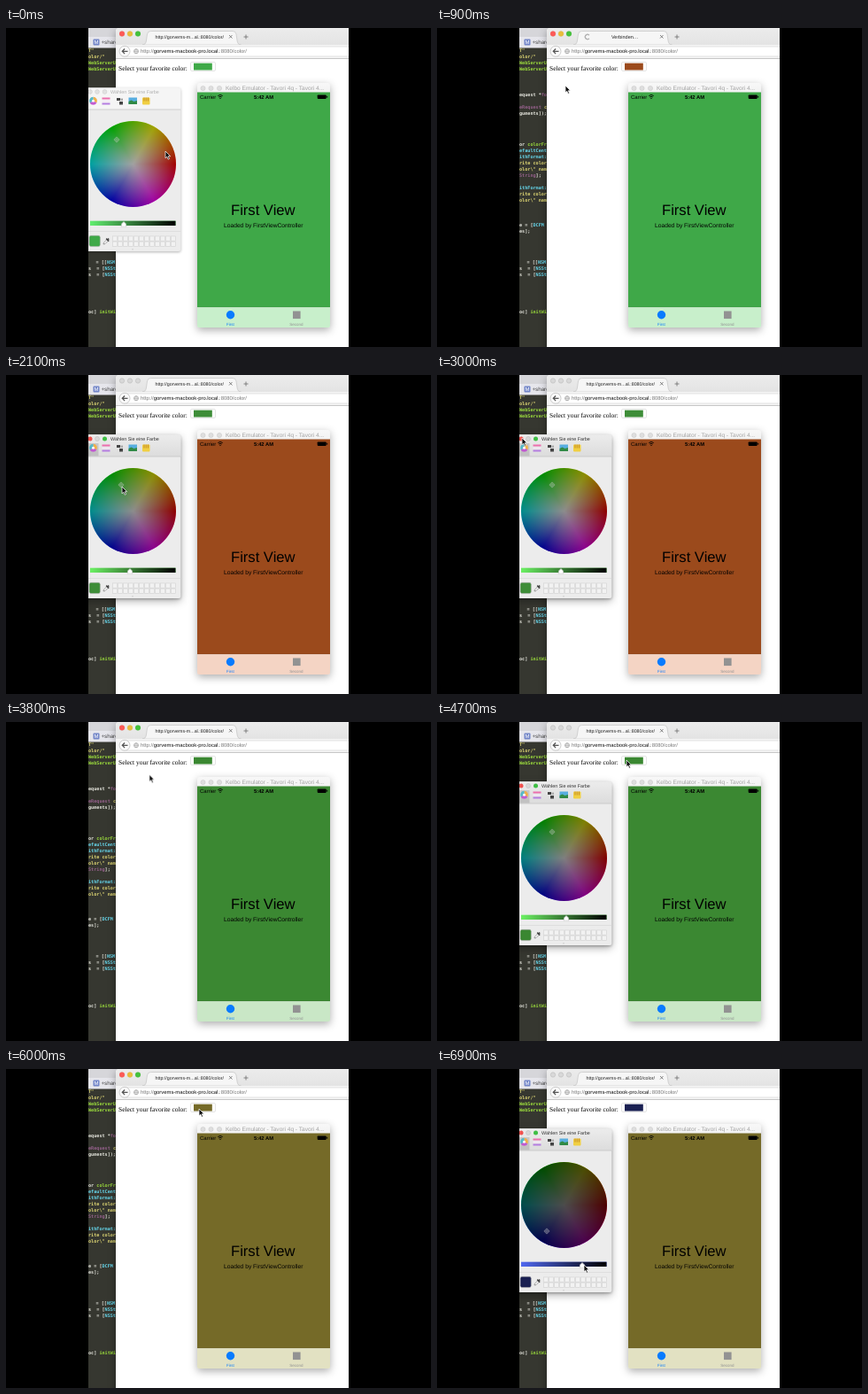
These frames come from a looping animation (480 by 360 pixels, 7000 ms). An HTML page:

```html
<!DOCTYPE html>
<html lang="de">
<head>
<meta charset="utf-8">
<title>Color picker</title>
<style>
html, body { margin: 0; width: 100%; height: 100%; overflow: hidden; background: #000; }
.stage { position: relative; width: 480px; height: 360px; overflow: hidden; clip-path: inset(0 93px 0 93px); }
.stage > *, .picker > * { position: absolute; left: 0; top: 0; }
.picker { width: 480px; height: 360px; }
svg { display: block; }
text { font-family: "Liberation Sans", Arial, sans-serif; text-rendering: geometricPrecision; white-space: pre; }
.code text { font: bold 5.15px "DejaVu Sans Mono", monospace; fill: #e8e8e0; }
.code .s { fill: #e0d874; }
.code .g { fill: #9bdc3c; }
.code .c { fill: #66d9ef; }
.code .p { fill: #94608a; }
.shadow { filter: drop-shadow(0 3px 5px rgba(0, 0, 0, .32)); }
.thin { filter: drop-shadow(0 1px 1.5px rgba(0, 0, 0, .3)); }

.picker .wheel { left: 94.8px; top: 105px; width: 97px; height: 97px; border-radius: 50%; overflow: hidden;
  background: radial-gradient(closest-side, #fff, rgba(255, 255, 255, 0)),
    conic-gradient(from 90deg, #f00, #f0f, #00f, #0ff, #0f0, #ff0, #f00); }
.dark { width: 100%; height: 100%; background: #000; }

.picker, .focus, .active, .title, .busy, .pick, .hue, .sim, .knob, .dark, .cross { animation: 7s step-end infinite; }
.picker { animation-name: picker; }
.focus { animation-name: focus; }
.active { animation-name: active; }
.title { animation-name: title; }
.busy { animation-name: busy; }
.pick { animation-name: pick; fill: currentColor; }
.hue { animation-name: hue; }
.sim { animation-name: sim; }
.knob { animation-name: knob; }
.dark { animation-name: dark; }
.cross { animation-name: cross; }
.spin { animation: spin .8s linear infinite; }
.cursor { animation: cursor 7s ease-in-out infinite; }

@keyframes picker { 0%, 21.4%, 65.7%, 87.1% { opacity: 1 } 10.7%, 44.3%, 77.1% { opacity: 0 } }
@keyframes focus { 2.8%, 21.4%, 65.7%, 87.1% { opacity: 0 } 0%, 10.7%, 44.3%, 77.1% { opacity: 1 } }
@keyframes active { 0% { opacity: 0 } 2.8%, 100% { opacity: 1 } }
@keyframes title { 0%, 15.7%, 49.3%, 81.4% { opacity: 1 } 11.4%, 45%, 77.8% { opacity: 0 } }
@keyframes busy { 0%, 15.7%, 49.3%, 81.4% { opacity: 0 } 11.4%, 45%, 77.8% { opacity: 1 } }
@keyframes pick {
  0% { color: #3fa948 }
  2.8% { color: #9b4a1c }
  28.5% { color: #3e8d38 }
  45% { color: #3a8731 }
  71.4% { color: #756a28 }
  90.7% { color: #272f82 }
  93.6% { color: #272f82; animation-timing-function: linear }
  97.9%, 100% { color: #1a2052 }
}
@keyframes hue {
  0% { fill: #62ee70 }
  2.8% { fill: #ff7a2e }
  28.5% { fill: #6cf064 }
  71.4% { fill: #ffe757 }
  90.7%, 100% { fill: #5068f0 }
}
@keyframes sim {
  0% { fill: #3fa848; color: #c8efcb }
  15% { fill: #9b4a1c; color: #f4d4c4 }
  48.6% { fill: #3b8832; color: #c9e7c6 }
  81.4%, 100% { fill: #756a28; color: #e2e1c2 }
}
@keyframes knob {
  0% { transform: translate(133px, 221.5px) }
  21.4% { transform: translate(140px, 221.5px) }
  65.7% { transform: translate(146px, 221.5px) }
  93.6% { transform: translate(146px, 221.5px); animation-timing-function: linear }
  97.9%, 100% { transform: translate(164px, 221.5px) }
}
@keyframes dark {
  0% { opacity: .37 }
  21.4% { opacity: .45 }
  65.7% { opacity: .5 }
  93.6% { opacity: .5; animation-timing-function: linear }
  97.9%, 100% { opacity: .7 }
}
@keyframes cross {
  0% { transform: translate(125px, 126px) }
  2.8% { transform: translate(180px, 139px) }
  28.5% { transform: translate(130px, 124px) }
  71.4% { transform: translate(163px, 129px) }
  90.7%, 100% { transform: translate(124px, 183px) }
}
@keyframes cursor {
  0%, 3.6% { transform: translate(180px, 139px) }
  8.6%, 10.7% { transform: translate(96px, 71px) }
  12.86% { transform: translate(145px, 65px) }
  18.6%, 21.4% { transform: translate(218px, 44px) }
  28.5%, 33% { transform: translate(131px, 126px) }
  41.5%, 45% { transform: translate(96px, 71px) }
  53% { transform: translate(160px, 60px) }
  63%, 67.3% { transform: translate(214px, 43px) }
  71.4%, 73.5% { transform: translate(163px, 129px) }
  76.4%, 77.8% { transform: translate(96px, 71px) }
  85%, 87.8% { transform: translate(218px, 45px) }
  90.7%, 91.4% { transform: translate(124px, 183px) }
  93.6% { transform: translate(148px, 221px); animation-timing-function: linear }
  97.9%, 100% { transform: translate(166px, 221px) }
}
@keyframes spin { to { transform: rotate(360deg) } }
</style>
</head>
<body>
<div class="stage">
<svg width="480" height="360">
  <defs>
    <linearGradient id="chrome" x2="0" y2="1"><stop stop-color="#ececec"/><stop offset="1" stop-color="#dcdcdc"/></linearGradient>
    <linearGradient id="bar" x2="0" y2="1"><stop stop-color="#f8f8f8"/><stop offset="1" stop-color="#f2f2f2"/></linearGradient>
    <linearGradient id="fade"><stop stop-opacity="0"/><stop offset="1"/></linearGradient>
    <pattern id="cells" x="120" y="234.5" width="6" height="6.2" patternUnits="userSpaceOnUse">
      <rect x=".5" y=".5" width="5" height="5.2" fill="#f2f2f2" stroke="#d6d6d6" stroke-width=".7"/>
    </pattern>
  </defs>

  <!-- editor -->
  <rect x="93" width="40" height="360" fill="#363730"/>
  <rect x="93" width="40" height="10" fill="#d6d6da"/>
  <rect x="93" y="10" width="40" height="12.5" fill="#e6e6ec"/>
  <rect x="98.500" y="12.500" width="7" height="7" rx="1" fill="#7285c8"/>
  <text x="99.600" y="18.200" font-size="6" fill="#fff">M</text>
  <text x="107.500" y="18.200" font-size="6.200" fill="#444">+shared</text>
  <g class="code">
    <text class="s" x="93" y="27">T"</text>
    <text class="s" x="93" y="34">olor/"</text>
    <text class="g" x="93" y="41">WebServerURL</text>
    <text class="g" x="93" y="48">WebServerURL</text>
    <text x="93" y="77">equest *<tspan class="p">for</tspan></text>
    <text x="93" y="91"><tspan class="p">eRequest</tspan> <tspan class="s">c</tspan></text>
    <text x="93" y="98">guments]);</text>
    <text x="93" y="133">or <tspan class="g">colorFro</tspan></text>
    <text class="c" x="93" y="140">efaultCent</text>
    <text class="c" x="93" y="147">ithFormat:</text>
    <text class="s" x="93" y="154">rite color</text>
    <text class="s" x="93" y="161">olor\" name</text>
    <text x="93" y="168"><tspan class="p">String</tspan>];</text>
    <text class="c" x="93" y="182">ithFormat:</text>
    <text class="s" x="93" y="189">rite color</text>
    <text class="s" x="93" y="196">olor\" name</text>
    <text x="93" y="224">e = [<tspan class="c">DCFM</tspan></text>
    <text x="93" y="231">es];</text>
    <text x="101.500" y="266">= [[<tspan class="c">NSM</tspan></text>
    <text x="93" y="273">s  = [<tspan class="c">NSSt</tspan></text>
    <text x="93" y="280">s  = [<tspan class="c">NSSt</tspan></text>
    <text x="93" y="322">oc] <tspan class="g">initWi</tspan></text>
  </g>

  <!-- browser -->
  <rect class="shadow" x="124" y="0" width="280" height="380" rx="4" fill="#fff"/>
  <path d="M124 35V4q0-4 4-4H390V35z" fill="url(#chrome)"/>
  <path d="M154 19q4 0 4.500-5l1-7q.5-3.500 4-3.500H256q3.500 0 4 3.500l1 7q.5 5 4.500 5z" fill="#f6f6f6" stroke="#bcbcbc" stroke-width=".6"/>
  <rect x="124" y="19" width="266" height="15" fill="#f5f5f5"/>
  <path d="M124 34.500H390" stroke="#c0c0c0" stroke-width=".8"/>
  <g fill="#d8d8d8" stroke="#b4b4b4" stroke-width=".5">
    <circle cx="131" cy="6.500" r="2.700"/><circle cx="140" cy="6.500" r="2.700"/><circle cx="149" cy="6.500" r="2.700"/>
  </g>
  <g class="focus">
    <circle cx="131" cy="6.500" r="3" fill="#fc5b57"/><circle cx="140" cy="6.500" r="3" fill="#e8bd3c"/><circle cx="149" cy="6.500" r="3" fill="#45c13c"/>
  </g>
  <text class="title" x="168.500" y="12" font-size="5.300" fill="#222">http://gorvems-m...al.:8080/color/</text>
  <g class="busy">
    <text x="197" y="12" font-size="5.500" fill="#222">Verbinden…</text>
    <g transform="translate(170 10)"><path class="spin" d="M2.800 0A2.800 2.800 0 1 1 0-2.800" fill="none" stroke="#8a8a8a"/></g>
  </g>
  <path d="M252 8l3.500 3.500m0-3.500l-3.500 3.500M268.500 10h5m-2.500-2.500v5" stroke="#777" stroke-width=".9"/>
  <rect x="136" y="21" width="260" height="11" fill="#fff" stroke="#d0d0d0" stroke-width=".6"/>
  <circle cx="134" cy="26.300" r="6" fill="#fafafa" stroke="#b8b8b8" stroke-width=".7"/>
  <path d="M137.500 26.300h-6m2.600-2.800l-2.800 2.800l2.800 2.800" fill="none" stroke="#555" stroke-width="1.300"/>
  <g fill="none" stroke="#999" stroke-width=".6"><circle cx="147" cy="26.300" r="2.600"/><ellipse cx="147" cy="26.300" rx="1.200" ry="2.600"/><path d="M144.400 26.300h5.200"/></g>
  <text x="152" y="28.300" font-size="5.900" fill="#777">http://<tspan fill="#111">gorvems-macbook-pro.local.</tspan>:8080/color/</text>
  <text x="127" y="47.600" font-size="7.450" style="font-family:'Liberation Serif',Times,serif">Select your favorite color:</text>
  <rect x="208.500" y="38.500" width="28" height="10" rx="1.500" fill="#fff" stroke="#dadada" stroke-width=".7"/>
  <rect class="pick" x="212" y="39.700" width="20.800" height="7.800"/>

  <!-- phone -->
  <rect class="shadow" x="216" y="62" width="150" height="276" rx="2.500" fill="#eee"/>
  <path d="M216 73V65q0-3 3-3H363q3 0 3 3v8z" fill="url(#bar)"/>
  <g fill="#dedede" stroke="#c6c6c6" stroke-width=".5">
    <circle cx="222.500" cy="68" r="2.600"/><circle cx="231.500" cy="68" r="2.600"/><circle cx="241" cy="68" r="2.600"/>
  </g>
  <text x="248" y="70.300" font-size="6.550" fill="#a4a4a4">Kelbo Emulator - Tavori 4q - Tavori 4...</text>
  <g class="sim">
    <rect x="216" y="72.500" width="150" height="243"/>
    <path d="M216 315H366V336q0 2-2 2H218q-2 0-2-2z" fill="currentColor"/>
  </g>
  <path d="M216 315H366" stroke="#000" stroke-opacity=".2" stroke-width=".5"/>
  <text x="219" y="80" font-size="6">Carrier</text>
  <g fill="none" stroke="#000" stroke-width=".9"><path d="M239.300 76.500q2.700-2.200 5.400 0M240.300 78q1.700-1.400 3.400 0"/><circle cx="242" cy="79.400" r=".3"/></g>
  <text x="291" y="80" font-size="5.800" font-weight="bold" text-anchor="middle">5:42 AM</text>
  <rect x="351.700" y="75.500" width="10" height="4.400" rx=".8"/><rect x="362.200" y="76.800" width="1" height="1.800"/>
  <text x="254" y="211" font-size="16.600">First View</text>
  <text x="246" y="225" font-size="6.700">Loaded by FirstViewController</text>
  <circle cx="253.500" cy="323.800" r="4.700" fill="#087bff"/>
  <rect x="324" y="319.500" width="8.600" height="8.600" fill="#929292"/>
  <text x="253.300" y="336" font-size="4.500" text-anchor="middle" fill="#087bff">First</text>
  <text x="328" y="336" font-size="4.500" text-anchor="middle" fill="#929292">Second</text>
</svg>

<div class="picker">
  <svg width="480" height="360">
    <rect class="thin" x="80" y="67.500" width="117.300" height="184.500" rx="2.500" fill="#ececec"/>
    <path d="M80 92V67.500H194.300q3 0 3 3V92z" fill="#f5f5f5"/>
    <g fill="#e2e2e2" stroke="#c8c8c8" stroke-width=".5">
      <circle cx="95" cy="72" r="2.400"/><circle cx="103" cy="72" r="2.400"/><circle cx="111.500" cy="72" r="2.400"/>
    </g>
    <text x="118" y="74" font-size="5.400" fill="#b0b0b0">Wählen Sie eine Farbe</text>
    <g class="active">
      <rect class="shadow" x="80" y="67.500" width="117.300" height="184.500" rx="2.500" fill="#ececec"/>
      <path d="M80 92V67.500H194.300q3 0 3 3V92z" fill="url(#chrome)"/>
      <circle cx="95" cy="72" r="2.500" fill="#f0524f"/><circle cx="103" cy="72" r="2.500" fill="#d8d8d8" stroke="#b8b8b8" stroke-width=".5"/><circle cx="111.500" cy="72" r="2.500" fill="#3fbf45"/>
      <text x="118" y="74" font-size="5.400" fill="#333">Wählen Sie eine Farbe</text>
      <rect x="93" y="77" width="11.500" height="14.500" fill="#000" opacity=".13"/>
    </g>
    <path d="M80 92H197.300" stroke="#c2c2c2" stroke-width=".7"/>
    <path d="M80 229.500H197.300" stroke="#d8d8d8" stroke-width=".7"/>
    <g transform="translate(98.500 82.300)">
      <path d="M0 0V-4.500A4.500 4.500 0 0 1 3.900 2.250z" fill="#f0b04c"/>
      <path d="M0 0L3.900 2.250A4.500 4.500 0 0 1-3.900 2.250z" fill="#c15ad0"/>
      <path d="M0 0L-3.900 2.250A4.500 4.500 0 0 1 0-4.500z" fill="#57b9c8"/>
      <circle r="1.500" fill="#fff"/>
    </g>
    <g stroke-width="2"><path d="M108.500 79.500h9" stroke="#ec6fae"/><path d="M108.500 82.500h9" stroke="#f3e9f4"/><path d="M108.500 85.500h9" stroke="#b47de0"/></g>
    <path d="M125 79h4v3h-4zM128 83h4v3.500h-4z" fill="#444"/><path d="M129.500 79.500h2.500v2.500h-2.500z" fill="#aaa"/>
    <rect x="138.500" y="78.500" width="9.500" height="7.500" fill="#58aee0"/><path d="M138.500 86v-3l3-1.500l3 1.500l3.500-1v4z" fill="#318a45"/>
    <rect x="154" y="78.500" width="8.500" height="8" rx="1" fill="#f0cf42"/><path d="M156 78.500v4m2.200-4v4m2.200-4v4" stroke="#c58a28" stroke-width="1"/>
    <rect class="hue" x="95" y="217.700" width="96.500" height="5.300"/>
    <rect x="95" y="217.700" width="96.500" height="5.300" fill="url(#fade)"/>
    <path class="knob" d="M0-3l2.700 2.600v3.200h-5.400v-3.200z" fill="#fff" stroke="#aaa" stroke-width=".4"/>
    <rect class="pick" x="94" y="234.300" width="12.300" height="12.300" rx="2" stroke="#aaa" stroke-width=".6"/>
    <path d="M110 244l.5-1.800l3.500-3.500l1.400 1.400l-3.500 3.500z" fill="#fff" stroke="#666" stroke-width=".6"/>
    <path d="M113.200 237.600l3 3m-1.700-1.300l1.700-1.700" stroke="#444" stroke-width="1.500"/>
    <rect x="120" y="234.500" width="72" height="12.400" fill="url(#cells)"/>
    <circle cx="143" cy="249.700" r=".8" fill="#ccc"/>
  </svg>
  <div class="wheel"><div class="dark"></div></div>
  <svg width="480" height="360">
    <g class="cross" fill="none" stroke="#ccc" stroke-opacity=".6" stroke-width=".7"><circle r="2.300"/><path d="M-3.300 0h6.600M0-3.300v6.600"/></g>
  </svg>
</div>

<svg width="480" height="360">
  <path class="cursor" d="M0 0V7.800L1.800 6.200L3.100 9.200L4.500 8.600L3.200 5.700H5.700z" fill="#111" stroke="#fff" stroke-width=".7"/>
</svg>
</div>
</body>
</html>
```
